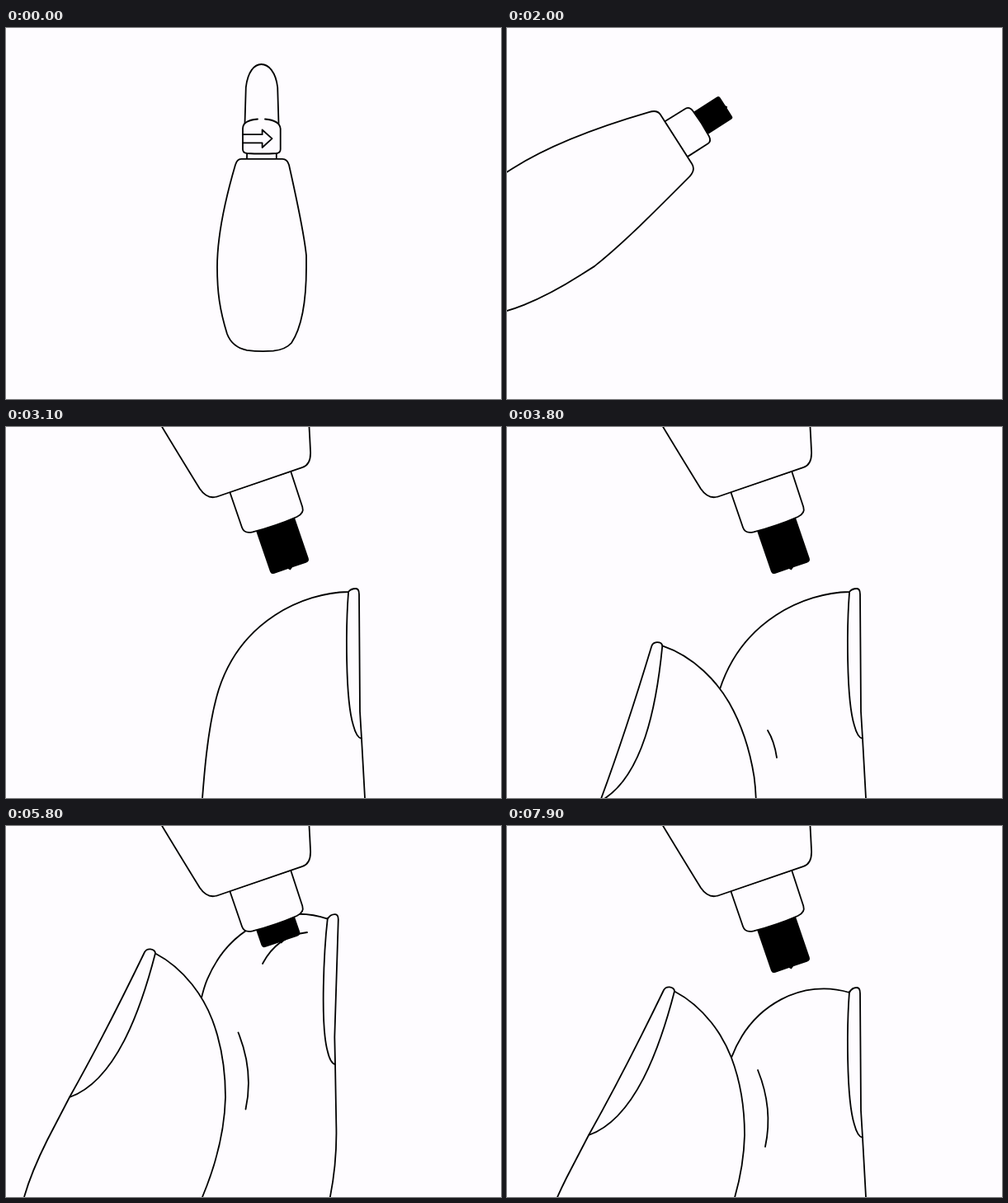
An HTML page for the animation above (8000 ms loop, 600x450 px).

```html
<!DOCTYPE html>
<html lang="en">
<head>
<meta charset="utf-8">
<title>Applicator instructions</title>
<style>
  html, body { margin: 0; width: 100%; height: 100%; overflow: hidden; background: #fefcff; }
  svg { display: block; width: 600px; height: 450px; }
  path { fill: #fefcff; stroke: #000; stroke-width: 1.8; stroke-linecap: round; stroke-linejoin: round; vector-effect: non-scaling-stroke; }
  .line { fill: none; }
  .crease { fill: none; vector-effect: none; }
  .plain { stroke: none; }
  .solid { stroke: none; fill: #000; }
</style>
</head>
<body>
<svg viewBox="0 0 600 450">
  <g id="index">
    <path id="indexOutline"/>
    <path class="line" d="M415 201C412 240 411 330 421 362Q425 377 431 378"/>
  </g>
  <g id="bottle">
    <g id="nozzle">
      <path class="solid" d="M300.5 108H308.5L310 107L311 108H319Q321 108 321 110V136H298.3V110Q298.3 108 300.5 108Z"/>
    </g>
    <path d="M292 159L292.3 138Q292.4 134.3 297 133.8Q310 132.8 323 133.8Q327.8 134.3 327.8 138V159Z"/>
    <path d="M285 158.8H335Q341 158.8 343 166C352 206 361 246 364 276V290C364 330 358 364 346 382Q339 390 324 391.7Q307 393 292 390.8Q274 387 268 371C259 342 256 320 256 290C256 250 266 207 278 166Q280 158.8 285 158.8Z"/>
  </g>
  <g id="cap">
    <path d="M289.5 116L290.8 72C293 53 301 44 309.5 44C318 44 327 53 329.2 72L330.5 116"/>
    <path class="plain" d="M287 122Q288 111 305 110.5H314Q333 112 333 122V148Q333 152 328 152H292Q287 152 287 148Z"/>
    <path class="line" d="M305 110.5Q287 112 287 122V147Q287 151.5 292 152Q310 153 328 152Q332.7 151.5 332.7 147V122Q331.5 112 314 110.5"/>
    <path class="line" d="M287 129.2H310.6V123.5L322.5 134.2L310.6 145V139.3H287"/>
  </g>
  <path id="pinch" class="crease"/>
  <g id="thumb">
    <path d="M0 900Q15 570 44 496C52 468 62 447 72 427L99 375C131 318 161 259 190 199Q192 195 197 195.3Q203 196 203 200.5C240 220 262 255 272 281C283 310 288 345 288 375C287 415 278 453 260 496C235 555 225 700 220 900Z"/>
    <path class="line" d="M203 200.5C185 270 155 355 99 375"/>
  </g>
  <path id="dent" class="crease" d="M311 167C322 146 340 132 365 129"/>
</svg>
<script>
const LOOP = 8000;
const part = id => document.getElementById(id);
const [index, indexOutline, bottle, nozzle, cap, pinch, thumb, dent] =
  ['index', 'indexOutline', 'bottle', 'nozzle', 'cap', 'pinch', 'thumb', 'dent'].map(part);

const clamp = x => Math.min(1, Math.max(0, x));
const span = (t, from, to) => clamp((t - from) / (to - from));
const smooth = x => x * x * (3 - 2 * x);
const easeOut = x => 1 - (1 - x) ** 2;
const mix = (a, b, k) => a.map((v, i) => v + (b[i] - v) * k);

// Pose: [x, y, angle, scale] of a pivot given in the part's own coordinates.
function place(el, [px, py], [x, y, angle, scale = 1]) {
  el.setAttribute('transform',
    `translate(${x} ${y}) rotate(${angle}) scale(${scale}) translate(${-px} ${-py})`);
}

function reveal(el, k) {
  el.setAttribute('pathLength', 1);
  el.setAttribute('stroke-dasharray', `${k} 2`);
  el.style.visibility = k > 0.02 ? 'visible' : 'hidden';
}

const bottlePivot = [359.6, 93.5];
const bottleUp = [359.6, 93.5, 0, 1], bottleDown = [251.9, 236.3, 161.1, 2.18];

const indexPivot = [423, 197];
const indexAway = [1217, 509, 66], indexRest = [423, 197, 0], indexPressed = [398, 108, 2.2];

const thumbPivot = [196, 196];
const thumbAway = [165, 485, -22], thumbTouch = [180.7, 262, -9];
const thumbSqueeze = [196, 196, 0], thumbPressed = [174, 150, 0];

// Fingertip contour from the hidden side up to the nail.
const relaxed = [233, 520, 238, 455, 241, 372, 258, 318, 285, 235, 360, 201, 415, 200];
const squeezed = [245, 520, 250, 400, 262, 307, 272, 281, 297, 215, 360, 185, 415, 202];
const pinchSmall = [316, 368, 324, 381, 327, 401];
const pinchLarge = [304, 296, 323, 343, 313, 389];

function draw(t) {
  const lift = smooth(span(t, 400, 1300));
  const turn = smooth(span(t, 1400, 2890));
  const touch = easeOut(span(t, 3050, 3800));
  const squeeze = smooth(span(t, 3850, 4800));
  const press = smooth(span(t, 5300, 5800)) - smooth(span(t, 7200, 7850));

  cap.setAttribute('transform', `translate(0 ${-165 * lift})`);
  cap.style.visibility = lift < 1 ? 'visible' : 'hidden';

  place(bottle, bottlePivot, mix(bottleUp, bottleDown, turn));
  nozzle.setAttribute('transform', `translate(0 ${15 * span(press, 0.33, 1)})`);

  index.style.visibility = turn > 0.45 ? 'visible' : 'hidden';
  place(index, indexPivot, mix(mix(indexAway, indexRest, turn), indexPressed, press));
  const [x, y, ...curve] = mix(relaxed, squeezed, squeeze);
  indexOutline.setAttribute('d', `M220 900L${x} ${y}C${curve.join(' ')}` +
    'Q418 196 424 196Q428 196 428 203L429 345L431 378L435 450Q438 495 431 539Q405 680 390 900Z');

  const thumbPose = mix(mix(thumbAway, thumbTouch, touch), thumbSqueeze, squeeze);
  place(thumb, thumbPivot, mix(thumbPose, thumbPressed, press));

  const [ax, ay, ...bend] = mix(pinchSmall, pinchLarge, squeeze);
  pinch.setAttribute('d', `M${ax} ${ay}Q${bend.join(' ')}`);
  pinch.setAttribute('transform', `translate(${-22.5 * press} ${-45.5 * press})`);
  reveal(pinch, span(touch, 0.85, 1));

  dent.setAttribute('transform', `translate(${25 * (1 - press)} ${89 * (1 - press)})`);
  reveal(dent, span(press, 0.4, 0.95));
}

const start = performance.now();
function tick() {
  draw((performance.now() - start) % LOOP);
  requestAnimationFrame(tick);
}
tick();
</script>
</body>
</html>
```
